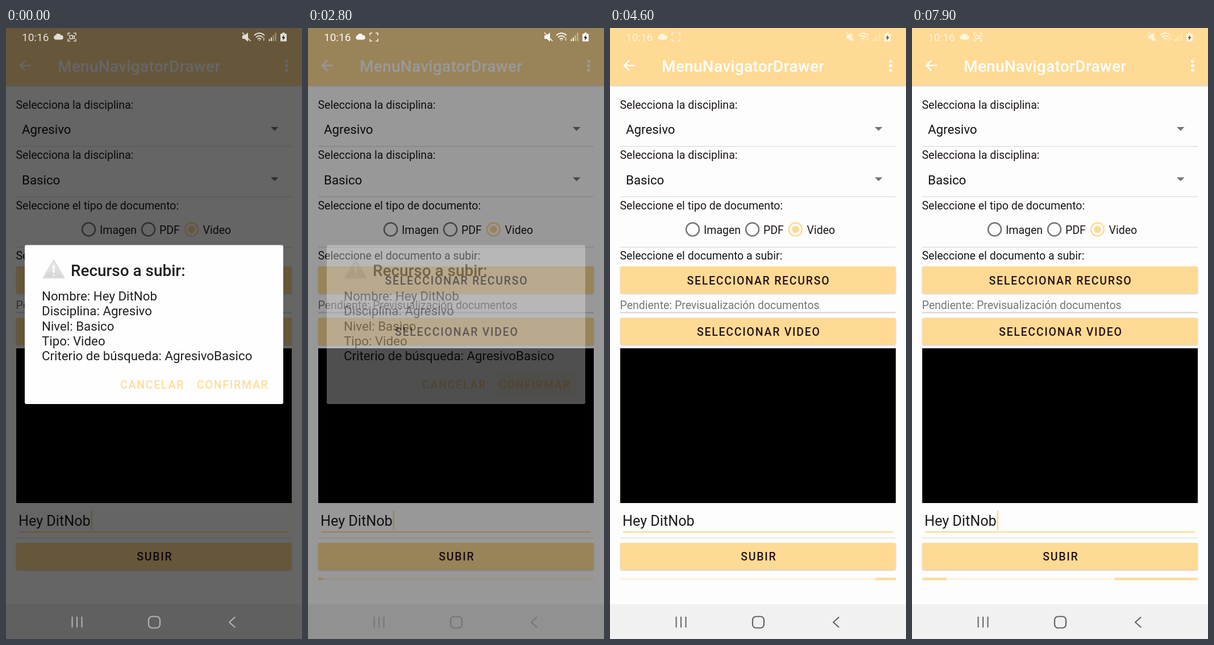
These frames come from a looping animation (521x1074 px, 8 s). An HTML page:

```html
<!DOCTYPE html>
<html lang="es">
<head>
<meta charset="utf-8">
<title>Subir recurso</title>
<style>
html, body { margin: 0; width: 100%; height: 100%; overflow: hidden; background: #fdfdfd; }
svg { display: block; width: 100%; height: 100%; font-family: Roboto, "Noto Sans", sans-serif; }
text { white-space: pre; }
.label { font-size: 19.5px; fill: #1d1619; }
.value { font-size: 22.3px; fill: #121012; }
.hint { font-size: 19.5px; fill: #777; }
.title { font-size: 27.9px; font-weight: 500; }
.button { font-size: 19.5px; font-weight: 500; letter-spacing: .0893em; fill: #271318; }
.accent { fill: #ffda94; }
.rule { fill: #dadada; }
.shadow { filter: drop-shadow(0 1.5px 1px rgba(0, 0, 0, .22)); }
.line { fill: none; stroke-linecap: round; stroke-linejoin: round; }
.mid { text-anchor: middle; }
</style>
</head>
<body>
<svg viewBox="0 0 521 1074" preserveAspectRatio="none">
  <rect width="521" height="1074" fill="#fdfdfd"/>

  <!-- App bar -->
  <rect class="accent shadow" width="521" height="101"/>
  <path class="line" d="M44 66H25M34 57l-9 9l9 9" stroke="#fff" stroke-width="2.5" style="stroke-linecap:butt;stroke-linejoin:miter"/>
  <text class="title" x="91" y="77" fill="#fff" letter-spacing=".35">MenuNavigatorDrawer</text>
  <g fill="#fff"><circle cx="494" cy="58.5" r="2.7"/><circle cx="494" cy="66.5" r="2.7"/><circle cx="494" cy="74.5" r="2.7"/></g>

  <!-- Form -->
  <text class="label" x="17.5" y="141.5">Selecciona la disciplina:</text>
  <text class="value" x="28" y="186">Agresivo</text>
  <path d="M466 174h13.500l-6.750 6.800z" fill="#757575"/>
  <rect class="rule" x="18" y="207.500" width="485" height="1.200"/>
  <text class="label" x="17.5" y="230">Selecciona la disciplina:</text>
  <text class="value" x="28" y="274.500">Basico</text>
  <path d="M466 262.500h13.500l-6.750 6.800z" fill="#757575"/>
  <rect class="rule" x="18" y="296" width="485" height="1.200"/>
  <text class="label" x="17.5" y="318.500">Seleccione el tipo de documento:</text>
  <g fill="none" stroke="#757575" stroke-width="2.500">
    <circle cx="145.500" cy="354" r="11.500"/>
    <circle cx="250.500" cy="354" r="11.500"/>
    <circle cx="326.500" cy="354" r="11.500" stroke="#ffda94"/>
  </g>
  <circle class="accent" cx="326.500" cy="354" r="6.300"/>
  <g class="label">
    <text x="165" y="362">Imagen</text><text x="270" y="362">PDF</text><text x="346.500" y="362">Video</text>
  </g>
  <rect class="rule" x="18" y="384.700" width="485" height="1.200"/>
  <text class="label" x="17.5" y="407">Seleccione el documento a subir:</text>
  <g class="accent shadow">
    <rect x="18" y="419" width="485" height="47.500" rx="3"/>
    <rect x="18" y="509.500" width="485" height="47.500" rx="3"/>
    <rect x="18" y="905" width="485" height="47.500" rx="3"/>
  </g>
  <g class="button mid">
    <text x="261.400" y="450.500">SELECCIONAR RECURSO</text>
    <text x="261.900" y="540.500">SELECCIONAR VIDEO</text>
    <text x="261.900" y="936">SUBIR</text>
  </g>
  <text class="hint" x="17.5" y="494.300">Pendiente: Previsualización documentos</text>
  <rect class="rule" x="18" y="499" width="485" height="2.500"/>
  <rect x="18" y="563" width="485" height="272"/>
  <text x="22" y="875" font-size="25.200" fill="#1c191b">Hey DitNob</text>
  <rect id="cursor" class="accent" x="149.500" y="848.500" width="2.500" height="33.500"/>
  <rect class="accent" x="23" y="884.700" width="475" height="2.300"/>
  <rect class="rule" x="18" y="896" width="485" height="1.200"/>

  <g id="progress" class="accent">
    <rect x="18" y="966.500" width="485" height="4" opacity=".3"/>
    <rect id="bar1" y="966.500" height="4"/>
    <rect id="bar2" y="966.500" height="4"/>
  </g>
  <rect y="1013" width="521" height="61" fill="#f1f1f1"/>

  <rect id="dim" width="521" height="1074"/>

  <!-- Dialog -->
  <g id="dialog">
    <rect x="33" y="381.500" width="455" height="279.500" rx="3" fill="#fefefe"/>
    <linearGradient id="grey" x2="0" y2="1"><stop stop-color="#f0f0f0"/><stop offset="1" stop-color="#d2d2d2"/></linearGradient>
    <path class="line" d="M84 409L102 439H66z" style="fill:url(#grey)" stroke="#dedede" stroke-width="3"/>
    <path class="line" d="M84 418.500v10.500M84 434.300v.2" stroke="#fff" stroke-width="3"/>
    <text class="title" x="114" y="436" fill="#212121">Recurso a subir:</text>
    <g font-size="22.300" fill="#212121">
      <text x="63" y="479.300">Nombre: Hey DitNob</text>
      <text x="63" y="505.400">Disciplina: Agresivo</text>
      <text x="63" y="531.500">Nivel: Basico</text>
      <text x="63" y="557.700">Tipo: Video</text>
      <text x="63" y="583.800">Criterio de búsqueda: AgresivoBasico</text>
    </g>
    <rect id="ripple" x="333" y="604" width="140" height="46" rx="4" fill="#fff8ec"/>
    <g class="button" style="fill:#ffdc9c">
      <text x="201" y="633.500">CANCELAR</text><text x="336" y="633.500">CONFIRMAR</text>
    </g>
  </g>

  <!-- Status bar -->
  <g id="status" fill="#fff" stroke="#fff" stroke-width="0">
    <text x="28" y="22.800" font-size="19">10:16</text>
    <path d="M87.500 20.500a4 4 0 0 1-.3-7.800a5.200 5.200 0 0 1 9.300-.2a4 4 0 0 1 .5 8z"/>
    <path class="line" d="M109 12.500v-3.500h3.500M119.500 9h3.500v3.500M123 19.500v3.500h-3.500M112.500 23h-3.500v-3.500" stroke-width="1.500"/>
    <path id="rec" class="line" d="M112 13h5v6h-5zM117 15.500l3.500-2v5.500l-3.500-2" stroke-width="1.400"/>
    <path d="M416 13h4l6-5v16l-6-5h-4z"/>
    <path class="line" d="M416.500 8.500l13.500 14" stroke-width="1.700"/>
    <path class="line" d="M437.500 12.500q8.500-7 17 0M440.500 16q5.500-4.500 11 0M443.500 19.300q2.500-2 5 0" stroke-width="1.800"/>
    <path d="M444.500 21l1.500 2l1.500-2zM452 18.500l1.700-2.200l1.700 2.200zM452 20l1.700 2.200l1.700-2.200z"/>
    <path d="M462.500 19.500h2v3.500h-2zM466 16.500h2v6.500h-2z"/>
    <path d="M469.500 12.500h2v10.500h-2zM473.500 8.500h2v14.500h-2z" opacity=".5"/>
    <path d="M486.500 8h4v2h2.500q1 0 1 1v11.500q0 1-1 1h-9q-1 0-1-1v-11.500q0-1 1-1h2.500z"/>
    <path d="M489.500 12l-4 5.500h2.500l-1 4.500l4.500-6h-2.700z" fill="#111"/>
  </g>

  <!-- Navigation bar -->
  <g id="nav" class="line" stroke-width="2">
    <path d="M116.500 1035.500v17.500M125 1035.500v17.500M133.500 1035.500v17.500"/>
    <rect x="251" y="1034.500" width="20" height="20" rx="6" stroke-width="2.200"/>
    <path d="M402.500 1036l-9.500 8.500l9.500 8.500" stroke-width="2.200"/>
  </g>
</svg>
<script>
const LOOP = 8000, STEP = 100, CLOSE = 2800, BAR_START = 2740;
const LEFT = 18, WIDTH = 485, UNITS = 360;
const $ = id => document.getElementById(id);

// Each curve is a chain of cubic segments; stops map its output to values.
const bars = [
  { id: "bar1",
    move: { curve: [0, 0, 0, 0, .2, 0, .2, 0, .396, 0, .475, .207, .592, .417, .715, .639, .816, .975, 1, 1],
            stops: [[0, -522.6], [1, 199.6]] },
    scale: { curve: [0, 0, 0, 0, .3665, 0, .3665, 0, .4725, .0624, .6154, .5, .6833, .5, .7548, .5, .7573, .8145, 1, 1],
             stops: [[0, .1], [.5, .827], [1, .1]] } },
  { id: "bar2",
    move: { curve: [0, 0, .0375, 0, .1288, .0895, .25, .2186, .3224, .2956, .4367, .4176, .4833, .4898, .69, .8097, .7933, .95, 1, 1],
            stops: [[0, -197.6], [1, 422.6]] },
    scale: { curve: [0, 0, .0683, .0199, .1922, .1586, .3333, .3493, .3841, .4148, .5495, .6814, .6667, .6828, .7526, .6828, .7373, .8789, 1, 1],
             stops: [[0, .1], [.3493, .571], [.6828, .91], [1, .1]] } }
];

const cubic = (a, b, c, d, u) => {
  const v = 1 - u;
  return v * v * v * a + 3 * v * v * u * b + 3 * v * u * u * c + u * u * u * d;
};

function ease(c, x) {
  let i = 0;
  while (i < c.length - 8 && x > c[i + 6]) i += 6;
  let lo = 0, hi = 1;
  for (let n = 0; n < 30; n++) {
    const u = (lo + hi) / 2;
    if (cubic(c[i], c[i + 2], c[i + 4], c[i + 6], u) < x) lo = u; else hi = u;
  }
  return cubic(c[i + 1], c[i + 3], c[i + 5], c[i + 7], lo);
}

function valueAt({ curve, stops }, phase) {
  const y = ease(curve, phase);
  let i = 0;
  while (i < stops.length - 2 && y > stops[i + 1][0]) i++;
  const [a, from] = stops[i], [b, to] = stops[i + 1];
  return from + (to - from) * (y - a) / (b - a);
}

function drawBar({ id, move, scale }, phase) {
  const center = UNITS / 2 + valueAt(move, phase);
  const half = 144 * valueAt(scale, phase);
  const clamp = v => Math.min(UNITS, Math.max(0, v)) * WIDTH / UNITS;
  const start = clamp(center - half), end = clamp(center + half);
  $(id).setAttribute("x", LEFT + start);
  $(id).setAttribute("width", end - start);
}

const show = (id, opacity) => $(id).setAttribute("opacity", opacity);

function draw(t) {
  const open = t < CLOSE, closing = t === CLOSE;
  show("dim", open ? .6 : closing ? .4 : 0);
  show("dialog", open ? 1 : closing ? .31 : 0);
  show("ripple", Math.min(1, Math.max(0, (t - 2500) / 200)));
  show("status", open ? .8 : closing ? .95 : .7);
  $("nav").setAttribute("stroke", open ? "#b4b4b4" : closing ? "#757575" : "#636363");

  show("rec", (t + 100) % 1000 < 500 ? 1 : 0);
  show("cursor", open || (t - CLOSE) % 1000 < 500 ? 1 : 0);

  show("progress", open ? 0 : 1);
  if (!open) bars.forEach(bar => drawBar(bar, (t - BAR_START) % 2000 / 2000));
}

const origin = performance.now();
function tick() {
  const t = (performance.now() - origin) % LOOP;
  draw(Math.floor(t / STEP) * STEP);
  requestAnimationFrame(tick);
}
tick();
</script>
</body>
</html>
```
